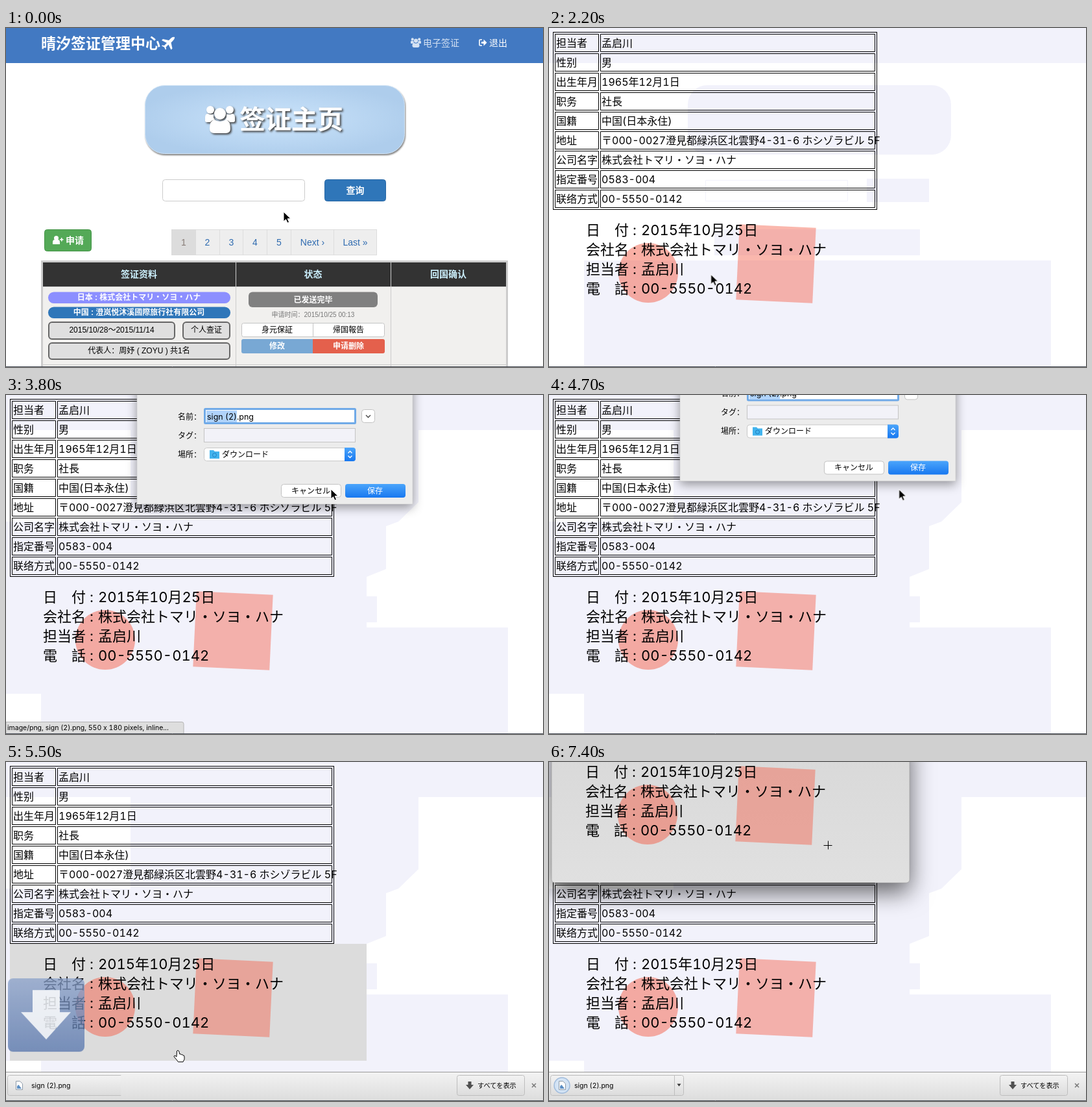
An HTML page that plays this animation: 828x522 px, repeating every 7.5 s.

```html
<!DOCTYPE html>
<html lang="zh">
<head>
<meta charset="utf-8">
<title>签证管理</title>
<style>
html, body { margin: 0; width: 100%; height: 100%; overflow: hidden; background: #fff; }
svg.stage { display: block; width: 828px; height: 522px; }
text { font-family: "Liberation Sans", "Noto Sans CJK SC", sans-serif; font-size: 12px; }
.m { text-anchor: middle; }
.e { text-anchor: end; }
.w { fill: #fff; font-weight: bold; }
.s14 text, text.s14 { font-size: 14px; }
.jp text, .jp { font-family: Inter, "Noto Sans CJK JP", sans-serif; font-variant-numeric: tabular-nums; }
.box { fill: #dfdfdf; stroke: #666; stroke-width: 2; }
.info text { font-size: 16px; }
.sign text { font-size: 22px; }
.ghost { fill: #f2f2fb; }
.glow { filter: drop-shadow(2px 2px 1.5px #444); }
.raised { filter: drop-shadow(1px 2px 1px rgba(0,0,0,.5)); }
.drop { filter: drop-shadow(0 5px 8px rgba(0,0,0,.4)); }
.deep { filter: drop-shadow(0 14px 18px rgba(0,0,0,.6)); }

/* one 7.5 s timeline: 100 ms = 1.3333% */
.home, .stain, .doc, .hover, .status, .arrow, .hand, .cross, .ring { animation: home 7.5s step-end infinite; }
.stain { animation-name: stain; }
.doc { animation-name: doc; }
.hover { animation-name: hover; }
.status { animation-name: status; }
.arrow { animation-name: arrow; }
.hand { animation-name: hand; }
.cross { animation-name: cross; }
.ring { animation-name: ring; }
.sheet, .bar, .item, .fall, .preview, .cursor { animation: sheet 7.5s linear infinite; }
.bar { animation-name: bar; }
.item { animation-name: item; }
.fall { animation-name: fall; }
.preview { animation-name: preview; transform-origin: 20px 498px; }
.cursor { animation-name: cursor; }

@keyframes home { 0% { visibility: visible } 22.667%, 100% { visibility: hidden } }
@keyframes stain { 0% { visibility: hidden } 44%, 100% { visibility: visible } }
@keyframes doc { 0% { visibility: hidden } 29.333%, 100% { visibility: visible } }
@keyframes hover { 0%, 40%, 78.667%, 100% { opacity: 0 } 33.333%, 72% { opacity: 1 } }
@keyframes status { 0%, 60%, 100% { visibility: hidden } 33.333% { visibility: visible } }
@keyframes arrow { 0%, 24%, 40%, 78.667% { visibility: visible } 18.667%, 33.333%, 70.667%, 90.667%, 100% { visibility: hidden } }
@keyframes hand { 0%, 24%, 40%, 78.667%, 100% { visibility: hidden } 18.667%, 33.333%, 70.667% { visibility: visible } }
@keyframes cross { 0% { visibility: hidden } 90.667%, 100% { visibility: visible } }
@keyframes ring { 0% { visibility: hidden } 76%, 100% { visibility: visible } }
@keyframes sheet {
  0%, 40% { transform: translateY(-200px) }
  45.333%, 60% { transform: none }
  62.667% { transform: translateY(-35px) }
  66.667%, 100% { transform: translateY(-200px) }
}
@keyframes bar { 0%, 69.333% { transform: translateY(48px) } 72%, 100% { transform: none } }
@keyframes item { 0%, 70.667% { clip-path: inset(0 207px 0 0) } 73.333% { clip-path: inset(0 31px 0 0) } 74.667%, 100% { clip-path: inset(0) } }
@keyframes fall {
  0%, 70.666% { transform: translateY(-80px); opacity: 0 }
  70.667% { transform: translateY(-80px); opacity: 1 }
  73.333% { transform: none; opacity: .9 }
  78.667%, 100% { transform: translateY(60px); opacity: 0 }
}
@keyframes preview {
  0%, 88% { transform: scale(.1); opacity: 0 }
  90.667%, 100% { transform: none; opacity: 1 }
}
@keyframes cursor {
  0%, 5.333% { transform: translate(428px, 283px) }
  6.667% { transform: translate(405px, 278px) }
  9.333% { transform: translate(378px, 288px) }
  12% { transform: translate(287px, 347px) }
  16%, 24% { transform: translate(241px, 403px) }
  33.333%, 40% { transform: translate(256px, 362px) }
  48%, 52% { transform: translate(501px, 145px) }
  57.333%, 62.667% { transform: translate(540px, 145px) }
  72%, 76% { transform: translate(265px, 444px) }
  82.667%, 88% { transform: translate(90px, 497px) }
  96%, 100% { transform: translate(430px, 128px) }
}
</style>
</head>
<body>
<svg class="stage" viewBox="0 0 828 522" width="828" height="522">
<defs>
  <radialGradient id="sky" cx=".5" cy=".5" r=".55"><stop stop-color="#cbe4fb"/><stop offset="1" stop-color="#aecdec"/></radialGradient>
  <linearGradient id="save" x2="0" y2="1"><stop stop-color="#4ba5fb"/><stop offset="1" stop-color="#1878f0"/></linearGradient>
  <linearGradient id="grey" x2="0" y2="1"><stop stop-color="#f3f3f3"/><stop offset="1" stop-color="#dcdcdc"/></linearGradient>
  <linearGradient id="blue" x2="0" y2="1"><stop stop-color="#8ba2cb"/><stop offset="1" stop-color="#5675ad"/></linearGradient>
  <linearGradient id="pane" x2="0" y2="1"><stop stop-color="#d8d8d8"/><stop offset="1" stop-color="#e0e0e0"/></linearGradient>
  <pattern id="rows" x="6" y="8" width="500" height="30" patternUnits="userSpaceOnUse">
    <path d="M3.5 1.5h67v27h-67zM73.5 1.5h423v27h-423z" fill="none" stroke="#000"/>
  </pattern>
  <symbol id="users" viewBox="0 0 46 43">
    <circle cx="8" cy="7" r="6"/><circle cx="38" cy="7" r="6"/>
    <path d="M0 24v-5q0-6 4-6 4 2 9 1-1 5 2 8-5 1-7 4H4q-4 0-4-2zM46 24v-5q0-6-4-6-4 2-9 1 1 5-2 8 5 1 7 4h4q4 0 4-2z"/>
    <circle cx="23" cy="13" r="9"/>
    <path d="M14 22q9 6 18 0 7 2 7 14 0 7-7 7H14q-7 0-7-7 0-12 7-14z"/>
  </symbol>
  <g id="sign" class="sign jp">
    <circle cx="147" cy="97" r="46" fill="#f4604a" opacity=".5"/>
    <rect x="285" y="25" width="118" height="116" fill="#f4604a" opacity=".45" transform="rotate(2.7 344 83)"/>
    <text x="51" y="39">日　付 :</text><text x="136" y="39">2015年10月25日</text>
    <text x="51" y="69">会社名 :</text><text x="136" y="69">株式会社トマリ・ソヨ・ハナ</text>
    <text x="51" y="99">担当者 :</text><text x="136" y="99">孟启川</text>
    <text x="51" y="129">電　話 :</text><text x="136" y="129">00-5550-0142</text>
  </g>
</defs>

<rect width="828" height="522" fill="#fff"/>

<!-- pale remains of the earlier page -->
<g class="ghost">
  <path d="M0 0h828v54H0zM490 232h96v36h-96zM255 310h317v40H255zM54 358h720v164H54z"/>
  <rect x="214" y="88" width="406" height="107" rx="30"/>
  <path d="M241.500 234.500h219v32h-219z" fill="none" stroke="#f2f2fb"/>
  <path class="stain" d="M192 54H636V165L605 195 586 202V268L556 280V310H572V350H556V358H774V522H55V460H0V195H192z"/>
</g>

<g class="doc jp">
  <rect x="6.500" y="6.500" width="499" height="273" fill="none" stroke="#000"/>
  <rect x="6" y="8" width="500" height="270" fill="url(#rows)"/>
  <g class="info">
    <text x="11" y="29">担当者</text><text x="81" y="29">孟启川</text>
    <text x="11" y="59">性别</text><text x="81" y="59">男</text>
    <text x="11" y="89">出生年月</text><text x="81" y="89">1965年12月1日</text>
    <text x="11" y="119">职务</text><text x="81" y="119">社長</text>
    <text x="11" y="149">国籍</text><text x="81" y="149">中国(日本永住)</text>
    <text x="11" y="179">地址</text><text x="81" y="179">〒000-0027澄見都緑浜区北雲野4-31-6 ホシゾラビル 5F</text>
    <text x="11" y="209">公司名字</text><text x="81" y="209">株式会社トマリ・ソヨ・ハナ</text>
    <text x="11" y="239">指定番号</text><text x="81" y="239">0583-004</text>
    <text x="11" y="269">联络方式</text><text x="81" y="269">00-5550-0142</text>
  </g>
  <rect class="hover" x="6" y="280" width="550" height="180" fill="#dcdcdc"/>
  <use href="#sign" x="6" y="280"/>
</g>

<g class="home">
  <rect width="828" height="522" fill="#fff"/>
  <rect width="828" height="54" fill="#4279c2"/>
  <text class="w" x="54" y="31.500" style="font-size:23px">晴汐签证管理中心</text>
  <path d="M260 14q-3-1-6 2l-3 3-9-2-2 2 8 4-4 4-3-.500-1 1 4 2 2 4 1-1-.500-3 4-4 4 8 2-2-2-9 3-3q3-3 2.500-5.500z" fill="#fff"/>
  <g class="s14">
    <use href="#users" x="624" y="15" width="16" height="15" fill="#d5e2f3"/>
    <text x="643" y="28" fill="#d5e2f3">电子签证</text>
    <path d="M734 18h-3q-1 0-1 1v7q0 1 1 1h3" fill="none" stroke="#fff" stroke-width="1.600"/>
    <path d="M733 21h3.500v-3.500l5 5-5 5V24H733z" fill="#fff"/>
    <text x="745" y="28" fill="#fff">退出</text>
  </g>

  <rect class="raised" x="214.500" y="88.500" width="400" height="105" rx="30" fill="url(#sky)" stroke="#d3e5f6"/>
  <g class="glow" fill="#fff">
    <use href="#users" x="307" y="119" width="46" height="43"/>
    <text class="w" x="360" y="155" style="font-size:40px">签证主页</text>
  </g>

  <rect x="241.500" y="233.500" width="219" height="33" rx="4" fill="#fff" stroke="#ccc"/>
  <rect x="491.500" y="233.500" width="94" height="33" rx="4" fill="#2f76b9" stroke="#2767a5"/>
  <text class="w m s14" x="538.500" y="255">查询</text>
  <rect x="59.500" y="310.500" width="72" height="33" rx="4" fill="#54a957" stroke="#449548"/>
  <path d="M72 333v-3q0-4 3-4h5q3 0 3 4v3zM83 325h2v-2h1.500v2h2v1.500h-2v2H85v-2h-2z" fill="#fff"/>
  <circle cx="77.500" cy="323.500" r="3.500" fill="#fff"/>
  <text class="w s14" x="92" y="332">申请</text>

  <rect x="255.500" y="310.500" width="316" height="39" fill="#eee" stroke="#ddd"/>
  <rect x="255" y="310" width="38" height="40" fill="#dcdcdc"/>
  <path d="M329.500 310v40M365.500 310v40M402.500 310v40M439.500 310v40M505.500 310v40" stroke="#ddd"/>
  <g class="m s14" fill="#2f6bb0">
    <text x="274" y="335" fill="#887d78">1</text><text x="310.500" y="335">2</text><text x="347.500" y="335">3</text>
    <text x="384" y="335">4</text><text x="421" y="335">5</text><text x="472.500" y="335">Next ›</text><text x="538.500" y="335">Last »</text>
  </g>

  <rect x="55.500" y="359.500" width="717" height="180" fill="#f1f0ee" stroke="#ccc" stroke-width="3"/>
  <rect x="57" y="361" width="714" height="37" fill="#333"/>
  <path d="M354.500 361v161M593.500 361v161M57 398.500h714M57 518.500h714" stroke="#ccc"/>
  <g class="m s14" fill="#cdf1ff" font-weight="bold">
    <text x="205" y="384">签证资料</text><text x="473.500" y="384">状态</text><text x="682" y="384">回国确认</text>
  </g>

  <rect x="65" y="406.500" width="281" height="17.500" rx="8.700" fill="#8c8fff"/>
  <text class="w m" x="205" y="419">日本 : 株式会社トマリ・ソヨ・ハナ</text>
  <rect x="65" y="429.500" width="281" height="17.500" rx="8.700" fill="#2f76b9"/>
  <text class="w m" x="205" y="442">中国 : 澄岚悦沐溪國際旅行社有限公司</text>
  <rect class="box" x="66" y="453" width="194" height="26" rx="5"/>
  <text class="m" x="163" y="469">2015/10/28～2015/11/14</text>
  <rect class="box" x="273" y="453" width="72" height="26" rx="5"/>
  <text class="m" x="309" y="469">个人查证</text>
  <rect class="box" x="66" y="485" width="279" height="25" rx="5"/>
  <text class="m" x="205" y="501">代表人：周妤 ( ZOYU ) 共1名</text>

  <rect x="374" y="406.500" width="199" height="23.500" rx="6" fill="#808080"/>
  <text class="w m" x="473.500" y="422.500">已发送完毕</text>
  <text class="m" x="473.500" y="445" fill="#777" style="font-size:10px">申请时间：2015/10/25 00:13</text>
  <rect x="363.500" y="454.500" width="220" height="21" rx="3" fill="#fff" stroke="#c4c4c4"/>
  <path d="M473.500 455v20" stroke="#c4c4c4"/>
  <text class="m" x="418" y="469">身元保証</text><text class="m" x="528" y="469">帰国報告</text>
  <path d="M473 479h-107q-3 0-3 3v16q0 3 3 3h107z" fill="#78a8d4"/>
  <path d="M473 479h108q3 0 3 3v16q0 3-3 3h-108z" fill="#e4604c"/>
  <text class="w m" x="418" y="494">修改</text><text class="w m" x="528" y="494">申请删除</text>
</g>

<g class="status">
  <path d="M0 503.500h271q3 0 3 3V522H0z" fill="#dedede" stroke="#b4b4b4"/>
  <text class="jp" x="2" y="516" style="font-size:10.500px">image/png, sign (2).png, 550 x 180 pixels, inline...</text>
</g>

<g class="sheet jp">
  <rect class="drop" x="202" y="-40" width="425" height="208" fill="#ececec" stroke="#c8c8c8" stroke-width=".5"/>
  <text class="e" x="301" y="37.500">名前：</text><text class="e" x="301" y="66.500">タグ：</text><text class="e" x="301" y="95.500">場所：</text>
  <rect x="306.500" y="21.500" width="232" height="22" rx="1" fill="#fff" stroke="#70aae8" stroke-width="3"/>
  <rect x="309" y="24" width="47" height="18" fill="#b0d3fb"/>
  <text x="310" y="38" style="font-size:12.500px">sign (2).png</text>
  <rect x="548.500" y="22.500" width="20" height="20" rx="4" fill="#fff" stroke="#c2c2c2"/>
  <path d="M555 31l3.500 3.500L562 31" fill="none" stroke="#444" stroke-width="1.300"/>
  <rect x="305.500" y="51.500" width="233" height="21" fill="#f2f2f8" stroke="#c4c4c4"/>
  <rect x="305.500" y="81.500" width="233" height="20" rx="4" fill="#fff" stroke="#c8c8c8"/>
  <path d="M522 81h13q4 0 4 4v13q0 4-4 4h-13z" fill="url(#save)"/>
  <path d="M527.500 89.500l3-3 3 3M527.500 93.500l3 3 3-3" fill="none" stroke="#fff" stroke-width="1.400"/>
  <path d="M314 85h6l2 2h7v11h-15z" fill="#42b4ee"/>
  <circle cx="321.500" cy="92.500" r="3" fill="none" stroke="#1e7fc0"/>
  <text x="333" y="95.500">ダウンロード</text>
  <rect x="424.500" y="137.500" width="92" height="20" rx="4" fill="#fff" stroke="#c2c2c2"/>
  <text class="m" x="470" y="152">キャンセル</text>
  <rect x="523" y="137" width="93" height="21" rx="4" fill="url(#save)"/>
  <text class="m" x="569" y="152" fill="#fff">保存</text>
</g>

<g class="bar jp">
  <rect y="477" width="828" height="45" fill="url(#grey)"/>
  <path d="M0 477.500h828" stroke="#9a9a9a"/>
  <g class="item">
    <rect x="2.500" y="482.500" width="205" height="31" rx="3" fill="url(#grey)" stroke="#bdbdbd"/>
    <g class="ring"><circle cx="20" cy="498" r="12" fill="#d3e3f4" stroke="#9fbbdc" stroke-width="1.500"/></g>
    <path d="M15.500 491.500h6l4 4v9h-10z" fill="#fff" stroke="#8d9aa8"/>
    <path d="M17 503v-4l2.500-2 4.500 6z" fill="#5d8fc4"/>
    <text x="39" y="502" style="font-size:10.500px">sign (2).png</text>
    <path d="M193.500 483v30" stroke="#bdbdbd"/><path d="M197.500 495.500h6l-3 4z" fill="#333"/>
  </g>
  <rect x="695.500" y="482.500" width="104" height="31" rx="3" fill="url(#grey)" stroke="#bdbdbd"/>
  <path d="M712.500 492h5v5h3.500l-6 7-6-7h3.500z" fill="#505050"/>
  <text x="727" y="502" style="font-size:10.200px">すべてを表示</text>
  <path d="M811 495l6 6M817 495l-6 6" stroke="#777" stroke-width="1.500"/>
</g>

<g class="fall">
  <rect x="3" y="333" width="118" height="113" rx="8" fill="url(#blue)" opacity=".85"/>
  <path d="M41 351h42v34h17L62 427 23 385h18z" fill="#fff" opacity=".85"/>
</g>

<g class="preview">
  <rect class="deep" x="4" y="-40" width="552" height="226" rx="5" fill="url(#pane)" stroke="#999" stroke-width=".6"/>
  <use href="#sign" x="5" y="-16"/>
</g>

<path d="M0 521.500h828" stroke="#4a4f58"/>

<g class="cursor">
  <path class="arrow" d="M0 0v15l3.500-3.300 2.500 5.500 2.600-1.100-2.500-5.400h5z" fill="#000" stroke="#fff"/>
  <path class="hand" d="M-1.500 1q1.500-2 3 0l1.500 5q2-1 2.500.800 2-1 2.500 1 2-.5 2 2v4l-2 4H.500l-3-4-3.500-4q0-2 2-1.500l2 1.500z" fill="#fff" stroke="#000"/>
  <path class="cross" d="M-6.500.500h13M.500-6.500v13" stroke="#000"/>
</g>
</svg>
</body>
</html>
```
